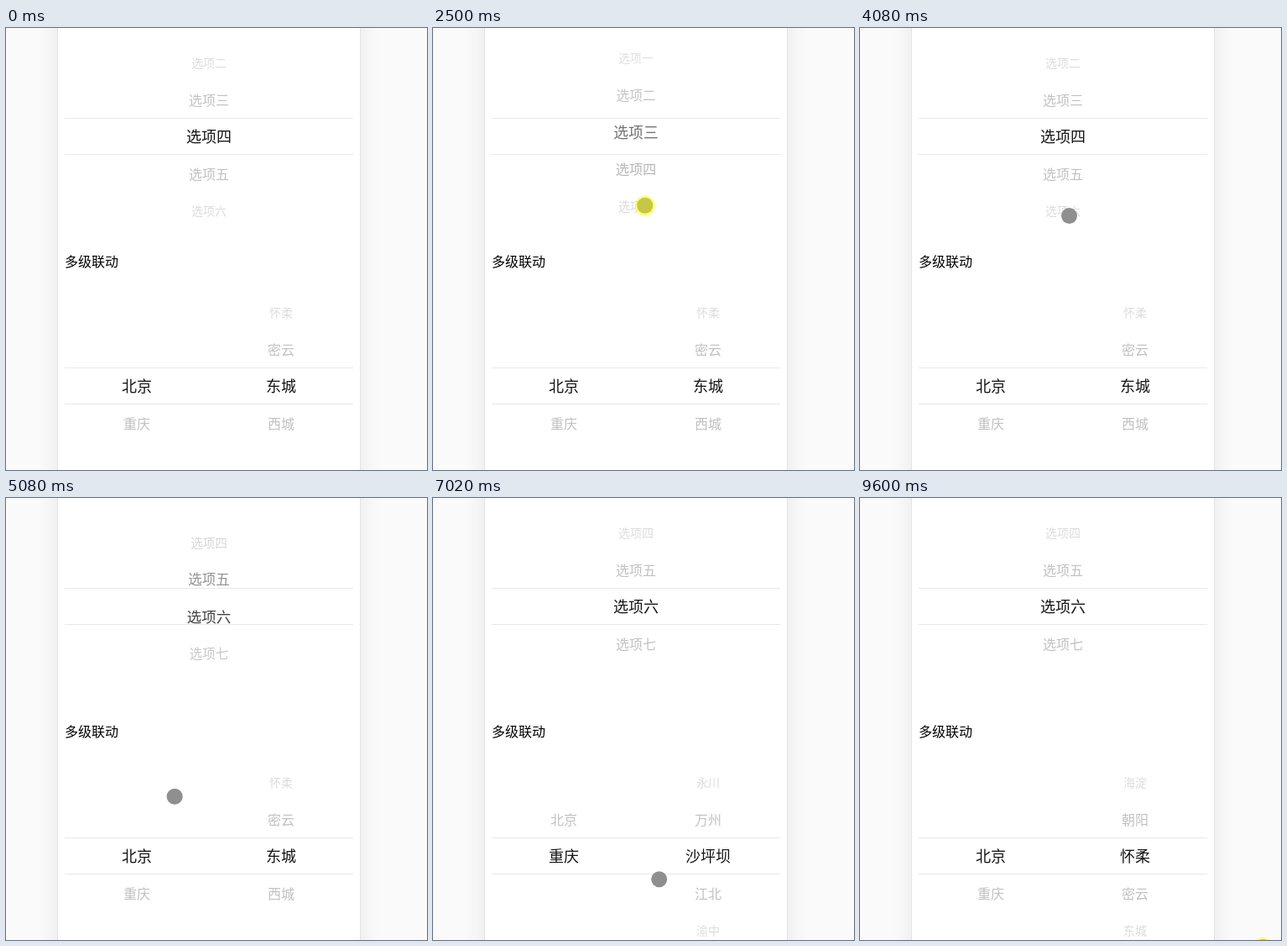
An HTML page with a canvas that plays this animation: 502 by 526 pixels, repeating every 9.67 s.

```html
<!DOCTYPE html>
<html lang="zh">
<head>
<meta charset="utf-8">
<style>
html, body { margin: 0; width: 100%; height: 100%; overflow: hidden; background: #fafafa; }
canvas { display: block; }
</style>
</head>
<body>
<canvas id="stage" width="502" height="526"></canvas>
<script>
const ctx = document.getElementById('stage').getContext('2d');
const LOOP = 9670, START = 120, TICK = 77.07;
const ROW = 44, REACH = 110;

const options = [...'一二三四五六七'].map(n => '选项' + n);
const cities = ['北京', '重庆'];
const districts = [
  ['海淀', '朝阳', '怀柔', '密云', '东城', '西城'],
  ['永川', '万州', '沙坪坝', '江北', '渝中']
];

const smooth = k => k * k * (3 - 2 * k);
const easeOut = k => 1 - (1 - k) ** 2;
const clamp = k => Math.max(0, Math.min(1, k));

// Each move runs from its start to its end time and arrives at the given values
function follow(t, from, moves, ease) {
  return moves.reduce((now, [start, end, ...to]) => {
    const k = ease(clamp((t - start) / (end - start)));
    return now.map((v, i) => v + (to[i] - v) * k);
  }, from);
}

const pointer = t => follow(t, [396, 501], [
  [120, 960, 264, 170],
  [960, 1510, 265, 64],
  [1660, 2590, 252, 214],
  [2590, 2900, 256, 399],
  [2900, 3210, 255, 250],
  [3440, 4000, 249, 223],
  [4620, 5450, 158, 471],
  [5930, 6470, 354, 505],
  [6630, 7400, 157, 385],
  [7720, 7904, 253, 401],
  [7904, 8400, 334, 512],
  [8660, 9060, 364, 545],
  [9440, 9590, 480, 534]
], smooth);

const dragging = t => t >= 960 && t < 2590;
const tapping = t => [3440, 4390, 5620, 6470, 7400, 8420, 9590].some(s => t >= s && t < s + 75);

// The first wheel sticks to the pointer while dragged, then coasts
const dragged = t => 3 - (pointer(t)[1] - 170) / 46.5;

function optionAt(t) {
  if (t < 960) return 3;
  if (t < 2590) return dragged(t);
  return follow(t, [dragged(2590)], [[2590, 3210, 0], [3440, 4000, 3], [4620, 5300, 5]], easeOut)[0];
}

const cityAt = t => follow(t, [0], [[5660, 5900, 1], [7680, 7960, 0]], easeOut)[0];
const districtAt = t =>
  follow(t, [4], [[5660, 5900, 0], [6550, 6940, 2], [7680, 7960, 0], [8580, 8970, 2]], easeOut)[0];

function label(text, x, y, size, color, align = 'center') {
  ctx.font = `300 ${size}px "Noto Sans CJK SC", "Noto Sans CJK", sans-serif`;
  ctx.textAlign = align;
  ctx.fillStyle = color;
  ctx.fillText(text, x, y + size * 0.38);
}

function shade(d, held) {
  const mid = held ? 102 : 20;
  return Math.round(d < 1 ? mid + (193 - mid) * d : Math.min(224, 193 + 27 * (d - 1)));
}

function wheel(items, x, y, pos, held) {
  ctx.save();
  ctx.beginPath();
  ctx.rect(x - 86, y - REACH, 172, REACH * 2);
  ctx.clip();
  items.forEach((text, i) => {
    const d = Math.abs(i - pos);
    if (d > 3) return;
    const g = shade(d, held);
    label(text, x, y + (i - pos) * ROW, 18 - 2 * d, `rgb(${g},${g},${g})`);
  });
  ctx.restore();
}

function disc(x, y, r, color) {
  ctx.fillStyle = color;
  ctx.beginPath();
  ctx.arc(x, y, r, 0, Math.PI * 2);
  ctx.fill();
}

function panel() {
  ctx.fillStyle = '#fafafa';
  ctx.fillRect(0, 0, 502, 526);
  ctx.save();
  ctx.shadowColor = 'rgba(0,0,0,0.08)';
  ctx.shadowBlur = 25;
  ctx.fillStyle = '#e4e4e4';
  ctx.fillRect(61, -60, 362, 646);
  ctx.restore();
  ctx.fillStyle = '#fff';
  ctx.fillRect(62, 0, 360, 526);
  ctx.fillStyle = '#e8e8e8';
  for (const y of [107, 150, 404, 447]) ctx.fillRect(70, y, 344, 1);
  label('多级联动', 70, 278, 16, '#000', 'left');
}

function draw(t) {
  panel();
  const city = cityAt(t);
  wheel(options, 242, 129.5, optionAt(t), dragging(t));
  wheel(cities, 156, 426.5, city);
  wheel(districts[Math.round(city)], 328, 426.5, districtAt(t));

  if (t < START) return;
  const [x, y] = pointer(t);
  disc(x + 0.5, y + 0.5, 9.5, '#8f8f8f');
  if (dragging(t) || tapping(t)) disc(x + 0.5, y + 0.5, 12, 'rgba(255,255,0,0.5)');
}

// The picture refreshes in even ticks
function frame(now) {
  const t = now % LOOP;
  draw(t < START ? 0 : START + Math.floor((t - START + 15) / TICK) * TICK);
  requestAnimationFrame(frame);
}
requestAnimationFrame(frame);
</script>
</body>
</html>
```
